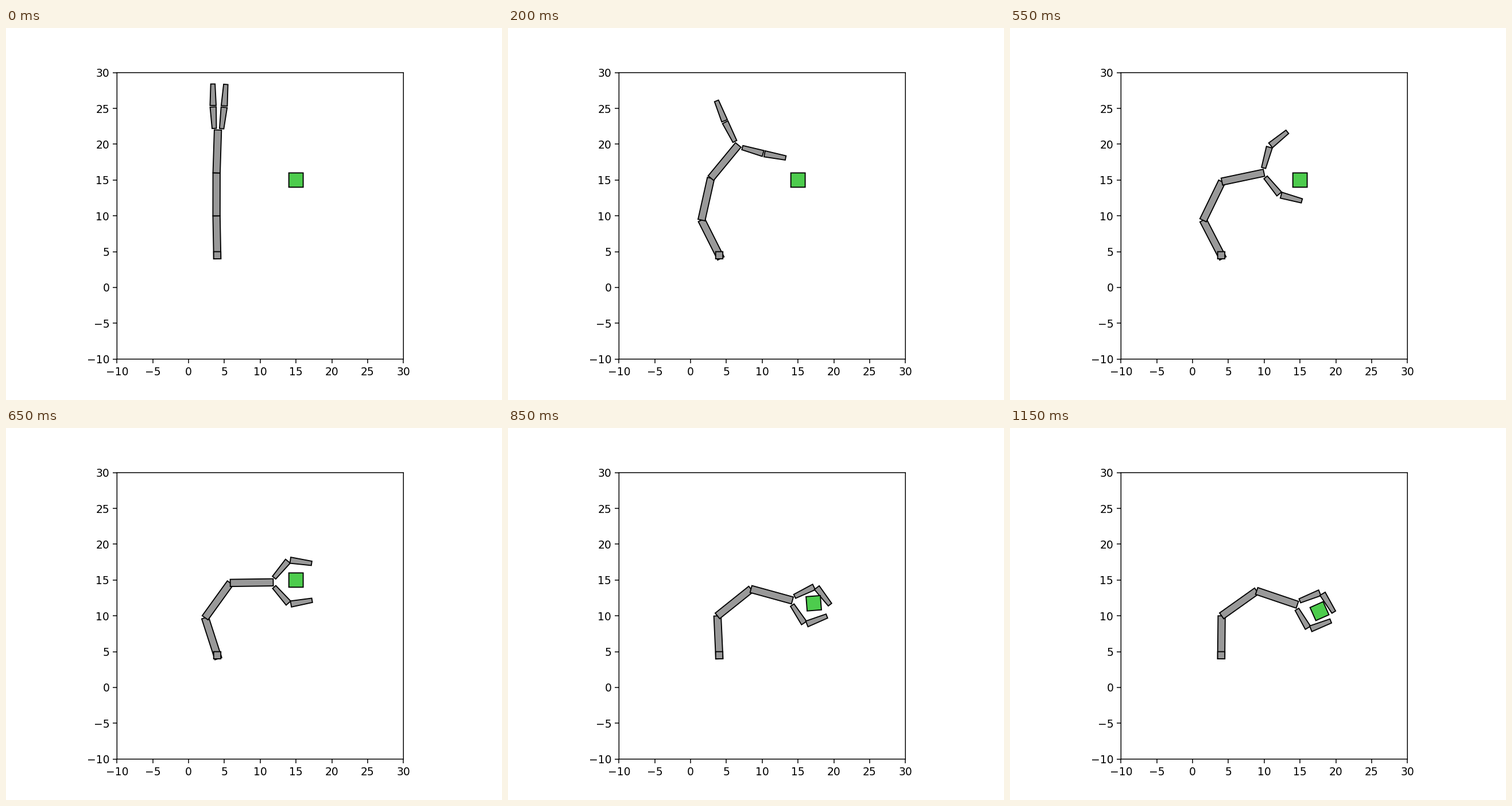
Animation, 864 px wide and 648 px high, one loop 1200 ms. Source, as a matplotlib script:

```python
import matplotlib.pyplot as plt
import numpy as np
from matplotlib.animation import FuncAnimation
from matplotlib.patches import Polygon

FRAMES, INTERVAL = 24, 50
GRAY, GREEN = (0.6, 0.6, 0.6), (0.3, 0.8, 0.3)
GRAB, RETURN = 8, 6      # when the hand closes, when the arm swings forward
TOUCH, STOP = 13, 19     # when the hand pushes the box


def settle(t, scale, power):
    """Rise from 0 to 1 like a motor slowing down at its limit."""
    return 1 - np.exp(-(max(t, 0) / scale) ** power)


def ramp(t, start, end):
    return np.clip((t - start) / (end - start), 0, 1)


def axes_of(angle):
    """Forward and rightward unit vectors for a clockwise angle from up."""
    a = np.radians(angle)
    return np.array([np.sin(a), np.cos(a)]), np.array([np.cos(a), -np.sin(a)])


def bar(start, angle, length, width0, width1):
    """Corners of a tapered bar and the middle of its far end."""
    forward, right = axes_of(angle)
    end = start + length * forward
    corners = [start - right * width0 / 2, start + right * width0 / 2,
               end + right * width1 / 2, end - right * width1 / 2]
    return corners, end


def square(center, size, angle=0):
    forward, _ = axes_of(angle)
    return bar(np.array(center) - forward * size / 2, angle, size, size, size)[0]


def finger(palm, palm_angle, side, spread, curl):
    """Two segments; the knuckle hinge sits toward the inner side."""
    pivot = palm + side * 0.5 * axes_of(palm_angle)[1]
    angle = palm_angle + side * spread
    forward, right = axes_of(angle)
    lower, end = bar(pivot + 0.2 * forward, angle, 3, 0.6, 0.85)
    hinge = end + 0.1 * forward - side * 0.2 * right
    angle -= side * curl
    forward, right = axes_of(angle)
    upper, _ = bar(hinge + 0.1 * forward + side * 0.2 * right,
                   angle, 3, 0.85, 0.6)
    return [lower, upper]


def arm(t):
    shoulder = (-1.1 - 35.5 * settle(t, 3.26, 1.2)
                + 37.2 * settle(t - RETURN, 8, 2.8))
    elbow = 1.2 + 52.8 * settle(t, 3.26, 1.2)
    wrist = 1.7 + 52.4 * settle(t, 5.2, 1.6)
    spread = (4.8 + 85.2 * settle(t, 3.33, 1.32)
              - 49.5 * settle(t - GRAB, 3.53, 1.52))
    curl = (2.5 + 6 * settle(t, 6, 2)
            + 72 * settle(t - GRAB, 4.55, 1.8))

    angle = shoulder
    point = np.array([4, 4.5]) - 0.5 * axes_of(angle)[0]
    parts = []
    for bend in (0, elbow, wrist):
        angle += bend
        corners, point = bar(point, angle, 6, 1, 1)
        parts.append(corners)
    parts.append(square((4, 4.5), 1))
    for side in (-1, 1):
        parts += finger(point, angle, side, spread, curl)
    return parts


def box(t):
    push, rebound = ramp(t, TOUCH, STOP), ramp(t, STOP, FRAMES - 1)
    x = 15 + 3.1 * push ** 0.85 - 0.38 * rebound
    y = 15 - 4.86 * push + 0.52 * rebound
    return square((x, y), 2, -15 * push ** 3 - 9 * rebound)


def pose(t):
    return arm(t) + [box(t)]


fig, ax = plt.subplots(figsize=(6.4, 4.8), dpi=135)
ax.set(xlim=(-10, 30), ylim=(-10, 30), aspect="equal")
for spine in ax.spines.values():
    spine.set_snap(False)
shapes = [ax.add_patch(Polygon(c, closed=True, fc=GRAY, ec="black", lw=1,
                               snap=False))
          for c in pose(0)]
shapes[-1].set_facecolor(GREEN)


def update(frame):
    for shape, corners in zip(shapes, pose(frame)):
        shape.set_xy(corners)
    return shapes


anim = FuncAnimation(fig, update, frames=FRAMES, interval=INTERVAL,
                     repeat=True, repeat_delay=0)
plt.show()
```
